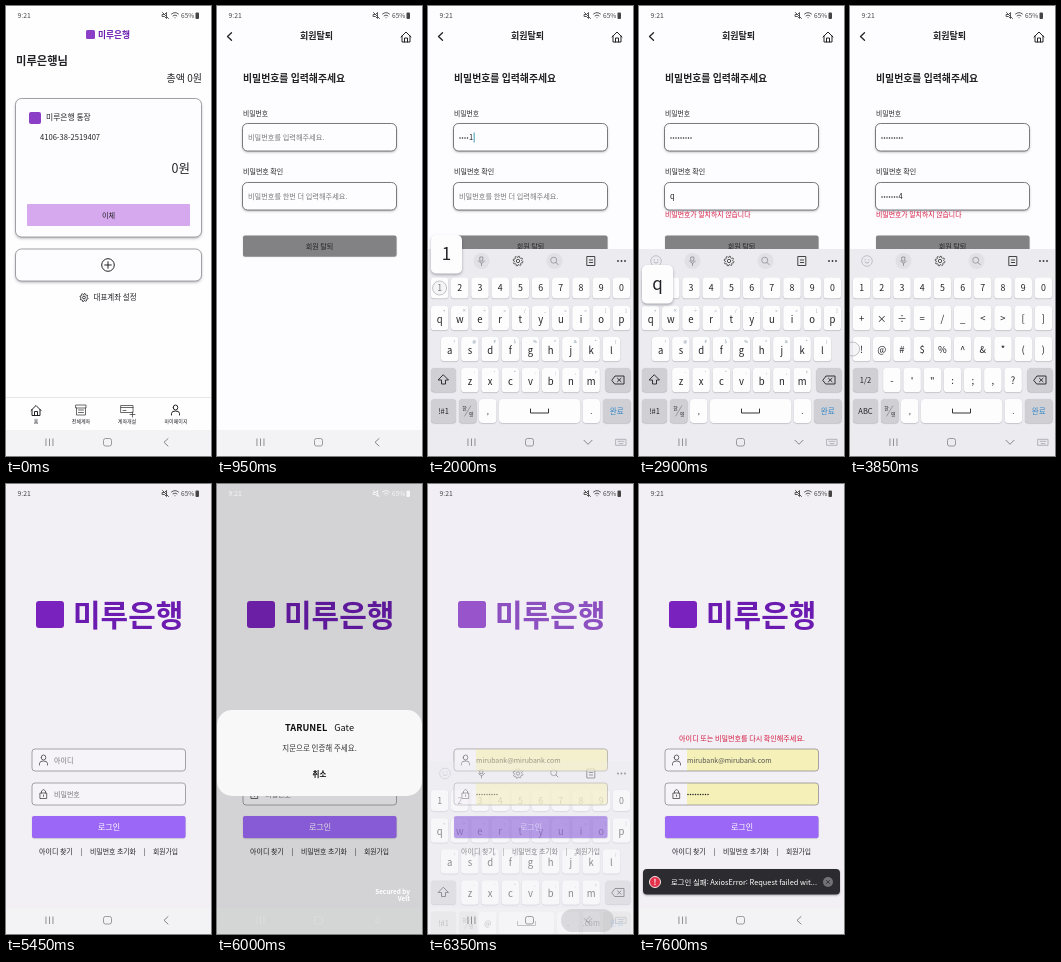
Recreate the animation shown at these times as an HTML page with a canvas. Size 205 by 450 pixels, loop 7.65 s.

```html
<!DOCTYPE html>
<html lang="ko">
<head>
<meta charset="utf-8">
<style>
html, body { margin: 0; width: 100%; height: 100%; overflow: hidden; background: #fefeff; }
canvas { display: block; width: 205px; height: 450px; }
</style>
</head>
<body>
<canvas id="stage"></canvas>
<script>
const LOOP = 7650, W = 205, H = 450;
const INK = '#222226', RED = '#d5173f', VIOLET = '#9b67f6', BRAND = '#6b1bb0';
const FONT = '"Noto Sans CJK KR","Noto Sans CJK JP","Noto Sans CJK",sans-serif';
const canvas = document.getElementById('stage'), g = canvas.getContext('2d');
const dpr = window.devicePixelRatio || 1;
canvas.width = W * dpr;
canvas.height = H * dpr;

// Drawing helpers
const ramp = (t, a, b) => Math.min(1, Math.max(0, (t - a) / (b - a)));

function box(x, y, w, h, r, fill, stroke, shadow) {
  g.save();
  g.beginPath();
  g.roundRect(x, y, w, h, r);
  if (shadow) {
    g.shadowColor = 'rgba(40,40,55,.35)';
    g.shadowBlur = shadow * dpr;
    g.shadowOffsetY = shadow / 2 * dpr;
  }
  if (fill) { g.fillStyle = fill; g.fill(); }
  g.shadowColor = 'transparent';
  if (stroke) { g.strokeStyle = stroke; g.lineWidth = .8; g.stroke(); }
  g.restore();
}

function text(s, x, y, size, color = INK, align = 'left', weight = 400) {
  g.font = `${weight} ${size}px ${FONT}`;
  g.fillStyle = color;
  g.textAlign = align;
  g.textBaseline = 'middle';
  g.fillText(s, x, y);
}

const mid = (s, x, y, size, color, weight) => text(s, x, y, size, color, 'center', weight);

function icon(d, x, y, color = INK, width = 1) {
  g.save();
  g.translate(x, y);
  g.strokeStyle = color;
  g.lineWidth = width;
  g.lineCap = g.lineJoin = 'round';
  g.stroke(new Path2D(d));
  g.restore();
}

function disc(x, y, r, fill, stroke, width = .8) {
  g.beginPath();
  g.arc(x, y, r, 0, 7);
  if (fill) { g.fillStyle = fill; g.fill(); }
  if (stroke) { g.strokeStyle = stroke; g.lineWidth = width; g.stroke(); }
}

function fade(alpha, draw) {
  if (alpha <= 0) return;
  g.save();
  g.globalAlpha *= alpha;
  draw();
  g.restore();
}

function dots(n, x, y) {
  for (let i = 0; i < n; i++) disc(x + 1 + i * 2.5, y, .75, INK);
}

const HOUSE = 'M-5 0L0-5L5 0M-4-1V5H4V-1M-1.5 5V1H1.5V5';
const PERSON = 'M-2.3-2.5a2.3 2.5 0 1 0 4.6 0a2.3 2.5 0 1 0-4.6 0M-4 5V3.5Q-4 1 0 1Q4 1 4 3.5V5';
const LOCK = 'M-3.2-1H3.2V4.5H-3.2ZM-2-1V-3Q0-6 2-3V-1M0 1V2.4';
const BACK = 'M2-3.7L-2 0L2 3.7';

function gear(x, y, r, color) {
  g.beginPath();
  for (let i = 0; i <= 48; i++) {
    const a = i / 48 * Math.PI * 2, q = r * (.9 + .12 * Math.sign(Math.sin(a * 8)));
    g.lineTo(x + q * Math.cos(a), y + q * Math.sin(a));
  }
  g.strokeStyle = color;
  g.lineWidth = .9;
  g.stroke();
  disc(x, y, r * .35, null, color, .9);
}

// Screens
function statusBar(color) {
  text('9:21', 11.5, 9.5, 6.8, color);
  icon('M-3-1H-1L1-3V3L-1 1H-3ZM-3-3L3 3', 159.5, 9.5, color, .9);
  icon('M-3.5-1.5Q0-4.5 3.5-1.5M-2 .3Q0-1.5 2 .3M0 2.2V2.3', 169, 9.5, color, .9);
  text('65%', 175, 9.5, 6.6, color);
  box(189.5, 6.5, 3.5, 6.5, 1, color);
}

function home() {
  box(0, 0, W, H, 0, '#fefeff');
  box(80, 24, 9, 9, 1.5, '#8b3fc6');
  text('미루은행', 92, 28.5, 8.7, BRAND, 'left', 900);
  text('미루은행님', 10, 55, 11.3, INK, 'left', 700);
  text('총액 0원', 196, 72, 10, INK, 'right');
  box(9.5, 92.5, 186, 138.5, 6, '#fdfcff', '#8c8c90', 3);
  box(23, 106, 12, 12, 2, '#8b3fc6');
  text('미루은행 통장', 40, 111.5, 7.8);
  text('4106-38-2519407', 34, 131.5, 7.6);
  text('0원', 184, 162, 12.5, INK, 'right');
  box(21, 198, 163, 22, 1, '#d6a9ee');
  mid('이체', 102.5, 209, 7.2);
  box(9.5, 243, 186, 32, 6, '#fdfcff', '#8c8c90', 3);
  disc(102, 259, 6.3, null, INK, 1);
  icon('M-3.3 0H3.3M0-3.3V3.3', 102, 259);
  gear(78, 291.5, 4, INK);
  text('대표계좌 설정', 87.5, 291.5, 7.5);
  box(0, 391, W, .7, 0, '#dedee2');
  icon(HOUSE, 30, 404.5);
  icon('M-5-5H5V-2H-5ZM-4.5-2V5H4.5V-2M-2.5 0H2.5M-2.5 2.5H2.5', 75, 404, '#444', .8);
  icon('M-6-4H6V3H-6ZM-6-2H6M3 5H8M5.5 2.5V7.5M-4 1H-1', 121, 403.5, '#444', .8);
  icon(PERSON, 169.5, 404);
  ['홈', '전체계좌', '계좌개설', '마이페이지'].forEach((s, i) =>
    mid(s, [30, 75, 121, 170][i], 415.3, 5, INK));
}

// Each press: time, key, entry index
const PRESSES = [];
function schedule(times, entry) {
  [...'qwer1234!'].forEach((key, i) => PRESSES.push({ at: times[i], key, entry }));
}
schedule([1550, 1650, 1750, 1850, 1960, 2100, 2220, 2340, 2520], 0);
schedule([2820, 2940, 3060, 3180, 3300, 3430, 3560, 3690, 3880], 1);

function secret(entry, t, y, hint) {
  box(25.5, y, 154, 27.5, 5, '#fdfdff', '#5b5b60', 2.5);
  const typed = PRESSES.filter(p => p.entry === entry && p.at <= t);
  const n = typed.length, cy = y + 14;
  let end = 31;
  if (!n) text(hint, 31, cy, 7.2, '#77777c');
  else {
    const last = typed[n - 1], plain = t - last.at < 350;
    dots(plain ? n - 1 : n, 31, cy + .5);
    end += n * 2.5;
    if (plain) {
      text(last.key, 31 + (n - 1) * 2.5, cy, 7.5);
      end += 2.2;
    }
  }
  const focused = t > 1150 && t < 4060 && entry === (t < 2650 ? 0 : 1);
  if (focused && t % 1000 < 500) box(end, cy - 5, .9, 10, 0, '#2a91a4');
  return n;
}

function withdraw(t) {
  box(0, 0, W, H, 0, '#fdfdff');
  icon(BACK, 12.5, 30.5, INK, 1.3);
  mid('회원탈퇴', 99.5, 30, 9, INK, 700);
  icon(HOUSE, 189, 31);
  text('비밀번호를 입력해주세요', 26, 72, 9.9, INK, 'left', 700);
  text('비밀번호', 26, 107, 6.8);
  secret(0, t, 117.5, '비밀번호를 입력해주세요.');
  text('비밀번호 확인', 26, 165.5, 7);
  const n = secret(1, t, 176.5, '비밀번호를 한번 더 입력해주세요.');
  if (n && n < 9) text('비밀번호가 일치하지 않습니다', 26, 208.5, 6.9, RED, 'left', 500);
  if (t >= 4400) mid('회원 탈퇴가 완료되었습니다.', 103, 218.5, 7.3, RED, 500);
  box(26, 229.5, 153.5, 21, 2, n === 9 ? VIOLET : '#828184', null, 1);
  mid('회원 탈퇴', 102.5, 240, 7.1);
}

function login(t) {
  const filled = t >= 6200;
  box(0, 0, W, H, 0, '#f2f0f5');
  box(30, 117, 28, 27, 3, '#7a22bd');
  text('미루은행', 67, 131, 30, BRAND, 'left', 900);
  if (t >= 6800) mid('아이디 또는 비밀번호를 다시 확인해주세요.', 103, 254, 7.1, RED, 500);
  [[265, PERSON], [299, LOCK]].forEach(([y, shape], i) => {
    box(26, y, 153.5, 22, 3, '#f6f4f8');
    if (filled) box(48, y, 131.5, 22, [0, 3, 3, 0], '#f5f0b7');
    box(26, y, 153.5, 22, 3, null, '#8e8d94');
    icon(shape, 37.5, y + 11, '#444', .8);
    if (!filled) text(i ? '비밀번호' : '아이디', 48, y + 11, 7, '#77777c');
  });
  if (filled) {
    text('mirubank@mirubank.com', 48, 276, 6.9, '#555');
    dots(9, 48, 310.5);
  }
  box(26, 332, 153.5, 22, 2, VIOLET, null, 1);
  mid('로그인', 103, 343, 8, '#fff');
  text('아이디 찾기', 33, 367.5, 7);
  mid('|', 75.5, 367.5, 7);
  text('비밀번호 초기화', 84, 367.5, 6.9);
  mid('|', 138.5, 367.5, 7);
  text('회원가입', 147, 367.5, 6.8);
}

// Keyboard
const SYMBOLS = ['1234567890', '+×÷=/_<>[]', '!@#$%^&*()', '-\'":;,?'];
const LETTERS = ['1234567890', 'qwertyuiop', 'asdfghjkl', 'zxcvbnm'];
const ROW_Y = [282, 312, 343, 374, 405], STEP = 20.2;

function keyPos(rows, row, col) {
  const n = rows[row].length;
  return [102.5 + (col - (n - 1) / 2) * STEP, ROW_Y[row]];
}

function funcKey(x, w, y, label, color, fill = '#cfcfd4') {
  box(x, y - 12, w, 24, 3.5, fill, null, 1);
  if (label) mid(label, x + w / 2, y, 7.5, color);
}

function keyboard(t) {
  const symbols = (t > 2430 && t < 2700) || (t > 3790 && t < 5000);
  const rows = symbols ? SYMBOLS : LETTERS, mail = t > 5000;
  const tool = mail ? '#444' : '#909096', white = '#fdfdfe';
  box(0, 243, W, 350, 0, '#ebebf0');
  disc(17, 255, 5.3, null, '#b5b5bb');
  icon('M-2 1.2Q0 3.4 2 1.2M-1.8-1.5V-1M1.8-1.5V-1', 17, 255, '#b5b5bb');
  if (!mail) [53.5, 126.5].forEach(x => disc(x, 255, 8, '#e0e0e5'));
  icon('M-1.3-4H1.3V0H-1.3ZM-3 0Q0 4.5 3 0M0 2.4V4.5', 53.5, 255, tool, .9);
  gear(90, 255, 4.8, '#444');
  disc(125.7, 254.2, 3, null, tool);
  icon('M2 2L4 4', 126, 254.5, tool);
  icon('M-3.8-4.5H3.8V4.5H-3.8ZM-1.7-1H1.7M-1.7 1.5H1.7', 163, 255, '#444');
  [190, 193.5, 197].forEach(x => disc(x, 255, .9, '#333'));

  rows.forEach((row, r) => [...row].forEach((c, i) => {
    const [x, y] = keyPos(rows, r, i), h = r ? 24.5 : 21;
    box(x - 8.8, y - h / 2, 17.6, h, 3.5, white, null, 1);
    mid(c, x, y + (symbols || !r ? 0 : 1), r ? 9.5 : 8.8, INK);
    if (!symbols && r) mid(SYMBOLS[r][i], x + 4.5, y - 7.5, 4, '#6f8797');
  }));
  funcKey(3, 25, 374, symbols ? '1/2' : '');
  if (!symbols) icon('M0-5L5 0H2V4H-2V0H-5Z', 15.5, 374, INK, .9);
  funcKey(177.5, 25, 374);
  icon('M-6 0L-3-4H6V4H-3ZM-.5-1.7L3 1.7M3-1.7L-.5 1.7', 190, 374, INK, .9);
  funcKey(3, 25, 405, symbols ? 'ABC' : '!#1');
  funcKey(31, 17.5, 405);
  mid('한', 36.5, 402, 5);
  mid('영', 43, 408, 5);
  icon('M-3 5L3-5', 39.7, 405, '#777', .6);
  funcKey(51, 17.5, 405, mail ? '@' : ',', INK, white);
  const space = mail ? 55 : 81;
  funcKey(71, space, 405, '', INK, white);
  icon('M-9-2V2H9V-2', 71 + space / 2, 405, '#333');
  if (mail) funcKey(129, 22, 405, '.', INK, white);
  funcKey(154.5, 17.5, 405, mail ? '.com' : '.', INK, white);
  funcKey(175, 27.5, 405, '완료', '#2f86c8');

  for (const { at, key } of PRESSES) {
    if (t < at - 30 || t > at + 90) continue;
    const r = rows.findIndex(row => row.includes(key));
    if (r < 0) continue;
    const [x, y] = keyPos(rows, r, rows[r].indexOf(key));
    if (t >= at && !symbols) {
      const px = Math.min(171, Math.max(3, x - 15.5));
      box(px, y - 53, 31, 38.5, 5, white, null, 3);
      mid(key, px + 15.5, y - 34, 17);
    }
    if (t < at + 60) disc(symbols ? x - 9 : x, y, 7, 'rgba(235,235,240,.45)', 'rgba(150,150,155,.7)');
  }
}

// 0 = hidden, 1 = open
const openness = t => t < 5000
  ? ramp(t, 1150, 1350) - ramp(t, 4060, 4210)
  : ramp(t, 6130, 6230) - ramp(t, 6280, 6420);

function navigation(open, grey) {
  [-3.5, 0, 3.5].forEach(dx => box(43 + dx, 432.5, .9, 7.5, 0, grey));
  box(97.5, 432.5, 8, 7.5, 2, null, grey);
  fade(1 - open, () => icon(BACK, 160, 436.3, grey));
  fade(open, () => {
    icon('M-4-2L0 2L4-2', 160, 436.3, grey);
    icon('M-5-3H5V3H-5ZM-3-1H3M-2 1.3H2', 193, 436.3, '#a5a5aa', .8);
  });
}

function passSheet(t, shown) {
  fade(shown, () => {
    box(0, 0, W, H, 0, 'rgba(0,12,0,.13)');
    const rise = 30 * (1 - ramp(t, 5500, 5700)) ** 2;
    box(0, 226 + rise, W, 86, 15, '#f8f8f8');
    text('TARUNEL', 68, 244 + rise, 9.2, '#111', 'left', 800);
    text('Gate', 137, 244 + rise, 9.2, '#111', 'right', 500);
    mid('지문으로 인증해 주세요.', 102.5, 264 + rise, 7.5, '#333');
    mid('취소', 102.5, 290 + rise, 7.5, '#111', 700);
    text('Secured by', 193, 408, 6.4, '#fff', 'right', 700);
    text('Velt', 193, 415, 6.4, '#fff', 'right', 700);
  });
}

function toast(t) {
  fade(ramp(t, 6800, 6950), () => {
    box(4, 385, 197, 25.5, 4, '#2c2b2f', null, 2);
    disc(16, 398, 5.5, '#e5304a', '#f4e6e8', 1);
    mid('!', 16, 398, 8, '#fff', 700);
    text('로그인 실패: AxiosError: Request failed wit...', 32, 398, 7.4, '#fff', 'left', 500);
    disc(189, 398, 5, '#737277');
    icon('M-1.6-1.6L1.6 1.6M1.6-1.6L-1.6 1.6', 189, 398, '#2c2b2f', .8);
  });
}

function page(t) {
  if (t < 550) home();
  if (t < 5100) fade(ramp(t, 450, 550), () => withdraw(t));
  fade(ramp(t, 5000, 5100), () => login(t));
  box(0, 424, W, 26, 0, '#f3f3f5');
}

function render(t) {
  g.setTransform(dpr, 0, 0, dpr, 0, 0);
  page(t);
  const open = openness(t);
  if (open > 0) {
    g.save();
    g.translate(0, 68 * (1 - open));
    keyboard(t);
    g.restore();
    // The page shows through the sliding keyboard evenly
    fade(1 - open, () => page(t));
  }
  if (t > 6260 && t < 6450) box(133, 425, 53, 23, 11.5, 'rgba(110,110,115,.2)');
  const shown = ramp(t, 5500, 5650) - ramp(t, 6130, 6260), dimmed = shown > .5;
  passSheet(t, shown);
  statusBar(dimmed ? '#f6f6f6' : '#444');
  navigation(open, dimmed ? '#dedede' : '#85858a');
  toast(t);
}

const start = performance.now();
function tick() {
  render((performance.now() - start) % LOOP);
  requestAnimationFrame(tick);
}
tick();
</script>
</body>
</html>
```
